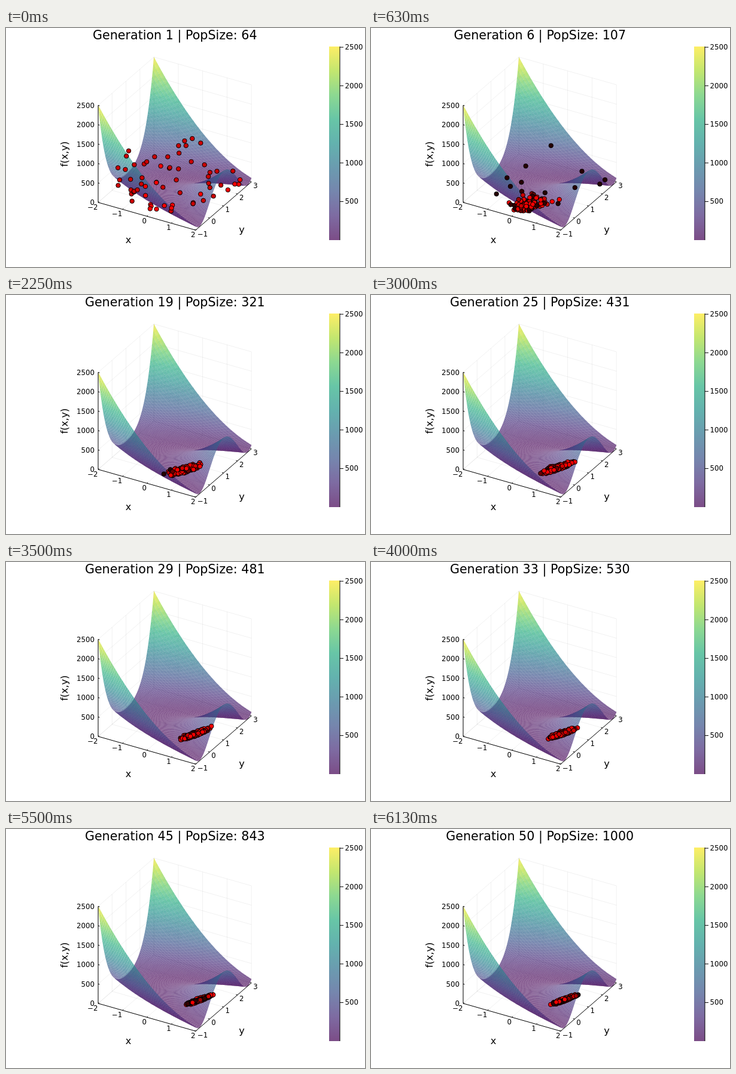
An HTML page with a canvas that plays this animation: 600 px wide and 400 px high, repeating every 6260 ms.

```html
<!DOCTYPE html>
<html lang="en">
<head>
<meta charset="utf-8">
<title>Evolving population</title>
<style>
  html, body { margin: 0; width: 100%; height: 100%; overflow: hidden; background: #fff; }
  canvas, svg { position: absolute; left: 0; top: 0; width: 600px; height: 400px; }
  text { font-family: "DejaVu Sans", sans-serif; fill: #000; }
</style>
</head>
<body>
<canvas id="stage" width="600" height="400"></canvas>
<svg id="labels" viewBox="0 0 600 400"></svg>
<script>
const W = 600, H = 400, LOOP = 6260, GENS = 50, TOP = 2509;
const ctx = document.getElementById('stage').getContext('2d');
const labels = document.getElementById('labels');

// x runs -2..2, y runs -1..3, z runs 0..2500
const project = (x, y, z) => [
  154 + (x + 2) * 40.75 + (y + 1) * 23.3,
  291.9 + (x + 2) * 11.6 - (y + 1) * 20.2 - z * 0.065
];
const cost = (x, y) => (1 - x) ** 2 + 100 * (y - x * x) ** 2;

const VIRIDIS = [[68, 1, 84], [71, 44, 122], [59, 82, 139], [44, 113, 142], [33, 145, 140],
  [39, 173, 129], [92, 200, 99], [170, 220, 50], [253, 231, 37]];

function shade(v) {
  const p = Math.max(0, Math.min(1, v)) * 8, i = Math.min(7, Math.floor(p));
  const c = VIRIDIS[i].map((a, k) => Math.round(a + (VIRIDIS[i + 1][k] - a) * (p - i)));
  return `rgba(${c},0.7)`;
}

function text(str, x, y, size, anchor = 'middle', turn = 0) {
  const el = document.createElementNS('http://www.w3.org/2000/svg', 'text');
  el.setAttribute('x', x);
  el.setAttribute('y', y);
  el.setAttribute('font-size', size);
  el.setAttribute('text-anchor', anchor);
  if (turn) el.setAttribute('transform', `rotate(${turn} ${x} ${y})`);
  el.textContent = str;
  labels.append(el);
  return el;
}

function line(c, points, color, width) {
  c.beginPath();
  points.forEach(p => c.lineTo(p[0], p[1]));
  c.strokeStyle = color;
  c.lineWidth = width;
  c.stroke();
}

function drawGrid(c) {
  const wire = (...pts) => line(c, pts.map(p => project(...p)), 'rgba(0,0,0,0.08)', 0.8);
  for (let i = 0; i <= 4; i++) {
    const x = i - 2, y = i - 1;
    wire([x, -1, 0], [x, 3, 0], [x, 3, 2500]);
    wire([2, y, 0], [-2, y, 0], [-2, y, 2500]);
  }
  for (let z = 0; z <= 2500; z += 500) wire([-2, -1, z], [-2, 3, z], [2, 3, z]);
}

function drawAxes(c) {
  const axis = (...pts) => line(c, pts.map(p => project(...p)), '#000', 1);
  axis([-2, -1, 2500], [-2, -1, 0], [2, -1, 0], [2, 3, 0]);
  for (let i = 0; i <= 4; i++) {
    const x = i - 2, y = i - 1;
    axis([x, -1, 0], [x, -0.93, 0]);
    axis([2, y, 0], [1.94, y, 0]);
  }
  for (let z = 0; z <= 2500; z += 500) axis([-2, -1, z], [-1.94, -1, z]);
}

function drawSurface(c) {
  const N = 99;
  const at = (i, j) => {
    const x = -2 + 4 * i / N, y = -1 + 4 * j / N, z = cost(y - 1, x + 1);
    return [...project(x, y, z), z];
  };
  // back to front
  for (let j = N - 1; j >= 0; j--) {
    for (let i = 0; i < N; i++) {
      const quad = [at(i, j), at(i + 1, j), at(i + 1, j + 1), at(i, j + 1)];
      c.fillStyle = shade(quad.reduce((s, p) => s + p[2], 0) / 4 / TOP);
      c.beginPath();
      quad.forEach(p => c.lineTo(p[0], p[1]));
      c.fill();
    }
  }
}

function drawBar(c) {
  const ramp = c.createLinearGradient(0, 355, 0, 31);
  for (let i = 0; i <= 8; i++) ramp.addColorStop(i / 8, shade(i / 8));
  c.fillStyle = ramp;
  c.fillRect(540, 31, 18, 324);
  line(c, [[558, 31], [558, 355]], '#000', 1);
  for (let v = 500; v <= 2500; v += 500) {
    const y = 355 - v * 324 / TOP;
    line(c, [[558, y], [564, y]], '#000', 1);
    text(v, 566.5, y + 4, 11.75, 'start');
  }
}

function addLabels() {
  const num = v => String(v).replace('-', '\u2212');
  for (let i = 0; i <= 4; i++) {
    const [ax, ay] = project(i - 2, -1, 0), [bx, by] = project(2, i - 1, 0);
    text(num(i - 2), ax - 0.5, ay + 11.6, 11.75, 'end');
    text(num(i - 1), bx + 3, by + 10.3, 11.75, 'start');
  }
  for (let z = 0; z <= 2500; z += 500) text(z, 148, project(-2, -1, z)[1] + 4.2, 11.75, 'end');
  text('x', 204.5, 360, 16.2);
  text('y', 394, 343, 16.2);
  text('f(x,y)', 103, 211, 16.2, 'middle', -90);
}

let seed = 20;
function rnd() {
  seed = (seed + 0x6D2B79F5) | 0;
  let t = Math.imul(seed ^ (seed >>> 15), 1 | seed);
  t = (t + Math.imul(t ^ (t >>> 7), 61 | t)) ^ t;
  return ((t ^ (t >>> 14)) >>> 0) / 4294967296;
}
const bell = () => 2 * (rnd() + rnd() + rnd() - 1.5);

// generation, population size
const SIZES = [[1, 64], [6, 107], [13, 211], [25, 431], [33, 530], [40, 685], [50, 1000]];

function sizeAt(g) {
  const i = SIZES.findIndex(s => s[0] >= g);
  if (SIZES[i][0] === g) return SIZES[i][1];
  const [g0, n0] = SIZES[i - 1], [g1, n1] = SIZES[i];
  return Math.round(n0 + (n1 - n0) * (g - g0) / (g1 - g0));
}

function settler() {
  const x = -2 + 4 * rnd(), y = -1 + 4 * rnd();
  return { x, y, age: cost(x, y) < 40 ? 0 : 1 };
}

// newborns gather along the valley y = x², closing in on (1, 1)
function newborn(g) {
  const mid = 1 - Math.exp(-((g / 17) ** 1.7));
  const spread = 0.085 + 0.28 * Math.exp(-g / 12);
  const x = mid + spread * bell();
  return { x, y: x * x + 1.1 * spread * bell(), age: 0 };
}

function evolve() {
  const gens = [Array.from({ length: sizeAt(1) }, settler)];
  for (let g = 2; g <= GENS; g++) {
    const size = sizeAt(g), limit = 2600 * Math.exp((1 - g) / 5);
    const fresh = 0.25 + 0.4 * Math.sin(Math.PI * (g - 1) / (GENS - 1));
    const able = gens[g - 2].filter(p => p.age < 7 && cost(p.x, p.y) < limit);
    const rate = size * (1 - fresh) / able.length;
    const next = able.filter(() => rnd() < rate).map(p => ({ ...p, age: p.age + 1 }));
    while (next.length < size) next.splice(Math.floor(rnd() * (next.length + 1)), 0, newborn(g));
    gens.push(next);
  }
  return gens;
}

function drawDot({ x, y, age }) {
  ctx.beginPath();
  ctx.arc(...project(x, y, cost(x, y)), 3.7, 0, Math.PI * 2);
  ctx.fillStyle = `rgb(${Math.round(255 * Math.max(0.15, 1 - 0.2 * age))},0,0)`;
  ctx.fill();
  ctx.stroke();
}

const plot = document.createElement('canvas');
plot.width = W;
plot.height = H;
const pc = plot.getContext('2d');
pc.fillStyle = '#fff';
pc.fillRect(0, 0, W, H);
drawGrid(pc);
drawSurface(pc);
drawAxes(pc);
drawBar(pc);
addLabels();

const title = text('', 282.3, 18.7, 20.65);
const population = evolve();
let shown = -1;

function show(g) {
  if (g === shown) return;
  shown = g;
  ctx.drawImage(plot, 0, 0);
  ctx.strokeStyle = '#000';
  ctx.lineWidth = 1;
  population[g].forEach(drawDot);
  title.textContent = `Generation ${g + 1} | PopSize: ${sizeAt(g + 1)}`;
}

const start = performance.now();
function tick() {
  const t = (performance.now() - start) % LOOP;
  let g = GENS - 1;
  while (g > 0 && Math.round(g * 12.5) * 10 > t) g--;
  show(g);
  requestAnimationFrame(tick);
}
tick();
</script>
</body>
</html>
```
